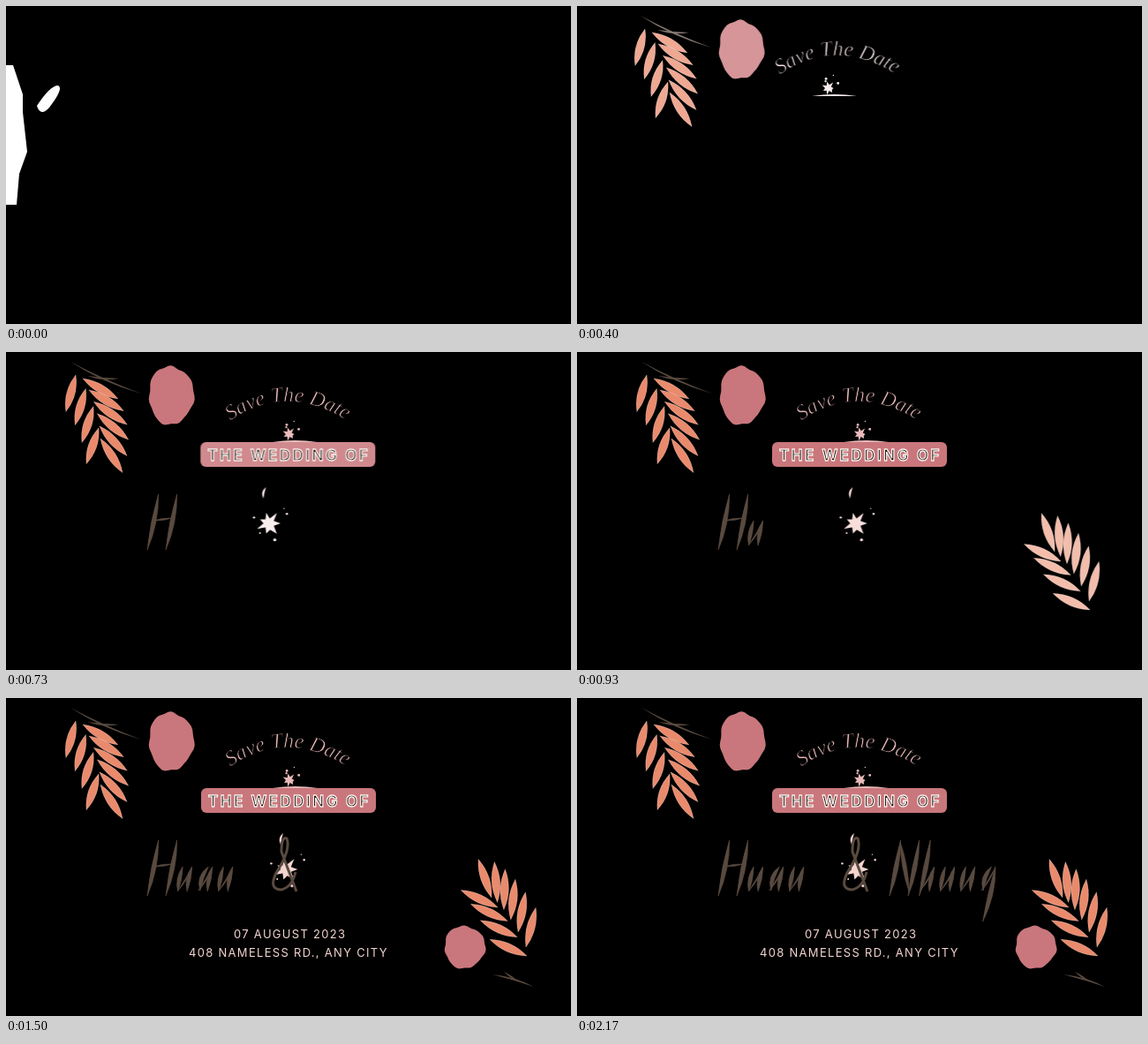
An HTML page for the animation above (5010 ms loop, 640 px wide and 360 px high).

```html
<!DOCTYPE html>
<html lang="en">
<head>
<meta charset="utf-8">
<title>Wedding invitation</title>
<style>
  html, body { margin: 0; width: 100%; height: 100%; overflow: hidden; background: #000; }
  svg { display: block; width: 100vw; height: 100vh; }
  text { font-family: Inter, "Open Sans", sans-serif; }
  .title { font-size: 17px; font-weight: 600; letter-spacing: 2.55px; fill: #000; stroke: #fff3ee; stroke-width: 1.3; }
  .arc { font: italic 24px "Liberation Serif", "Noto Serif", serif; stroke: #000; stroke-width: .7; }
  .line { font-size: 13px; letter-spacing: 1.3px; fill: #f3d5d1; }
  .leaf path { stroke: #fff; stroke-opacity: .4; stroke-width: .6; }
  .ink path { stroke: currentColor; stroke-width: .7; stroke-linejoin: round; }
</style>
</head>
<body>
<svg id="stage" viewBox="0 0 640 360" fill="currentColor">
  <defs><path id="curve" d="M254 78Q318 33 390 80"/></defs>
</svg>
<script>
const LOOP = 5010;
const BROWN = '#594a3f', ROSE = '#c9777c', CORAL = '#e98a6c';
const stage = document.getElementById('stage');
const sheet = document.head.appendChild(document.createElement('style'));
const pct = ms => (ms / LOOP * 100).toFixed(3) + '%';
const times = (n, f) => Array.from({ length: n }, (_, i) => f(i)).join('');
const polar = (x, y, r, a) => [x + r * Math.cos(a), y + r * Math.sin(a)];

let seed = 7;
const rnd = () => (seed = seed * 16807 % 2147483647) / 2147483647;

// Stroke tapered at both ends; bend moves its middle sideways
function pen([x1, y1], [x2, y2], w, bend = 0) {
  const len = Math.hypot(x2 - x1, y2 - y1);
  const nx = (y1 - y2) / len, ny = (x2 - x1) / len;
  const mid = k => `${(x1 + x2) / 2 + nx * k} ${(y1 + y2) / 2 + ny * k}`;
  return `<path d="M${x1} ${y1}Q${mid(bend + w)} ${x2} ${y2}Q${mid(bend - w)} ${x1} ${y1}Z"/>`;
}

// Row of leaves: bases on the curve a-b-c, angle turning from -> to in degrees
function leafRow(n, a, b, c, from, to, len, power = 1) {
  return times(n, i => {
    const t = i / (n - 1), s = 1 - t;
    const base = a.map((v, k) => s * s * v + 2 * s * t * b[k] + t * t * c[k]);
    const angle = (from + (to - from) * t ** power) * Math.PI / 180;
    return pen(base, polar(...base, len, angle), 9.5);
  });
}

// Closed shape with radius r(angle) times rx, ry
function round(cx, cy, rx, ry, r, n = 48) {
  const pts = Array.from({ length: n }, (_, i) => {
    const a = i / n * 2 * Math.PI, k = r(a, i);
    return [cx + rx * k * Math.cos(a), cy + ry * k * Math.sin(a)];
  });
  return `<path d="M${pts.join('L')}Z"/>`;
}
const petal = a => 1 + .035 * Math.sin(3 * a + 2) + .025 * Math.sin(7 * a) + .015 * Math.sin(11 * a);

// Ragged star with loose specks around it
const burst = (x, y, r, specks) =>
  round(x, y, r, r, (a, i) => i % 2 ? .35 + .2 * rnd() : .7 + .4 * rnd(), 14) +
  times(specks, () => {
    const [cx, cy] = polar(x, y, r * (1 + rnd()), rnd() * 2 * Math.PI);
    return `<circle cx="${cx}" cy="${cy}" r="${.6 + rnd() * 1.2}"/>`;
  });

let count = 0;
function add(markup, cls, color, label) {
  const g = document.createElementNS('http://www.w3.org/2000/svg', 'g');
  g.id = 'part' + count++;
  if (cls) g.setAttribute('class', cls);
  if (label) g.setAttribute('aria-label', label);
  g.style.color = color;
  g.innerHTML = markup;
  stage.appendChild(g);
  return g;
}

function animate(g, ...anims) {
  const list = anims.map(([frames, ease], i) => {
    const name = `${g.id}-${i}`;
    sheet.textContent += `@keyframes ${name}{${frames}}\n`;
    return `${name} ${LOOP}ms ${ease} infinite`;
  });
  sheet.textContent += `#${g.id}{animation:${list}}\n`;
}

const change = (prop, a, b, start, end, ease) =>
  [`0%,${pct(start)}{${prop}:${a}}${pct(end)},100%{${prop}:${b}}`, ease];
const showAt = ms => [`0%{opacity:0}${pct(ms)},100%{opacity:1}`, 'step-end'];
const slide = (start, end, dist) => change('transform', `translateX(${-dist}px)`, 'none',
  start, end, 'cubic-bezier(.215,.61,.355,1)');

// Slide in from the left while turning from white to the final colour
function enter(markup, color, start, dist, cls) {
  const end = start + 500;
  animate(add(markup, cls, color), slide(start, end, dist),
    change('color', '#fff', color, start, end, 'linear'), showAt(start + 110));
}

// Brief white shapes at the left edge
const flash = add('<path d="M0 67H8L19 100V120L24 165L15 190L12 225H0Z"/>' +
  '<path d="M35 113Q50 90 59 90Q66 93 49 115Q39 126 35 113Z"/>', '', '#fff');
animate(flash, [`0%{opacity:1}${pct(30)},100%{opacity:0}`, 'step-end']);

// Upper left spray
enter(pen([73, 11], [153, 47], 2, 5) + pen([92, 27], [128, 30], 2, 3), BROWN, 30, 45);
enter(leafRow(4, [79, 26], [98, 46], [105, 86], 105, 109, 43) +
  leafRow(6, [87, 30], [106, 62], [107, 98], 30, 57, 46, 2), CORAL, 30, 80, 'leaf');
enter(round(187, 49, 25.5, 33, petal), ROSE, 10, 65);

// Heading, bloom and banner
enter('<text class="arc"><textPath href="#curve">Save The Date</textPath></text>', '#e6b6b6', 220, 100);
enter(burst(321, 93, 8, 4) + pen([302, 102], [353, 102], 2, -2), '#e9b9b9', 270, 95);
enter('<rect x="221" y="102" width="198" height="28" rx="6"/>' +
  '<text class="title" x="229" y="123">THE WEDDING OF</text>', ROSE, 300, 100);

// Pale flower behind the ampersand
enter(burst(317, 194, 14, 5) + pen([314, 153], [311, 166], 2.5, 3), '#f4d4cf', 550, 80);

// Lower right spray
enter(leafRow(6, [550, 226], [566, 236], [589, 282], -109, -76, 46, .5) +
  leafRow(4, [557, 237], [574, 258], [590, 292], -155, -156, 46), CORAL, 650, 100, 'leaf');
enter(round(519.5, 282, 23, 24, petal), ROSE, 870, 85);
enter(pen([551, 313], [598, 327], 2, -3) + pen([564, 310], [580, 321], 2), BROWN, 870, 75);

// Date and place
const info = add('<text class="line" x="258" y="271.5">07 AUGUST 2023</text>' +
  '<text class="line" x="207" y="293">408 NAMELESS RD., ANY CITY</text>');
animate(info, slide(880, 1380, 80), change('opacity', 0, 1, 980, 1400, 'linear'));

// Brush letters: each pair is a stroke kind and its column
const BASE = 219, COL = 10.5;
const spot = (x, h) => [x + h * .2, BASE - h];
const strokes = {
  I: x => pen(spot(x, 58), spot(x, -5), 5, -2),
  i: x => pen(spot(x, 28), spot(x, 0), 4.5, 2),
  j: x => pen(spot(x, 28), spot(x - 2, -34), 5, -3),
  c: x => pen(spot(x + 6, 28), spot(x + 2, 1), 4.5, 6),
  v: x => pen(spot(x, 1), spot(x + COL, 27), 1.3, 2),
  x: x => pen(spot(x, 56), spot(x + 2 * COL, 0), 4.5),
  t: x => pen(spot(x, 28), spot(x + 2 * COL, 31), 2)
};
const glyphs = {
  H: 'I0 t0 I2', N: 'I0 x0 I2', h: 'I0 v0 i1', u: 'i0 v0 i1', a: 'c0 v0 i1', n: 'i0 v0 i1', g: 'c0 v0 j1'
};

function write(name, x, at) {
  [...name].forEach((letter, i) => {
    const marks = glyphs[letter].split(' ');
    const ink = marks.map(([kind, col]) => strokes[kind](x + col * COL)).join('');
    animate(add(ink, 'ink', BROWN, letter), showAt(at[i]));
    x += (+marks.at(-1)[1] + 1.2) * COL;
  });
}
write('Huan', 161, [730, 870, 1050, 1170]);
const and = add('<path d="M329 219L312 174Q312 156 318 159Q323 172 306 198Q297 217 312 217Q324 214 328 197" ' +
  'fill="none" stroke="currentColor" stroke-width="3"/>', '', BROWN, '&amp;');
animate(and, showAt(1400));
write('Nhung', 355, [1730, 1830, 1930, 2070, 2170]);
</script>
</body>
</html>
```
